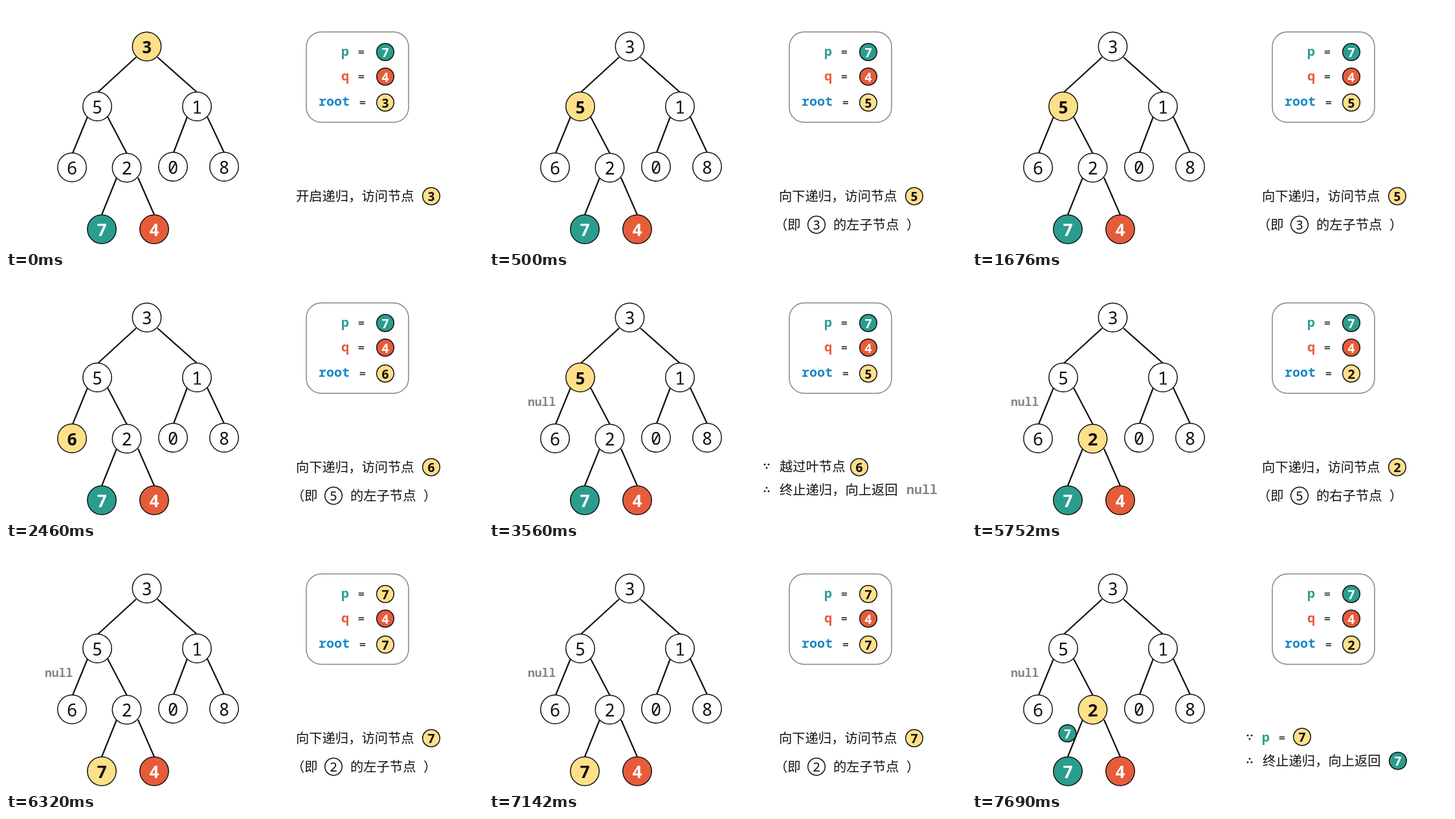
Write an HTML page that moves like this. It is 737 px wide and 375 px high and loops after 8000 ms.

```html
<!DOCTYPE html>
<html lang="zh-CN">
<head>
<meta charset="utf-8">
<style>
html, body { margin: 0; width: 100%; height: 100%; overflow: hidden; background: #fff; }
svg { display: block; width: 737px; height: 375px; }
text { white-space: pre; }
.mono { font-family: "Noto Sans Mono", "DejaVu Sans Mono", monospace; }
.han { font: 500 20.3px "Noto Sans CJK SC", "Noto Sans CJK", sans-serif; }
</style>
</head>
<body>
<svg id="stage" viewBox="0 0 737 375"></svg>
<script>
const stage = document.getElementById('stage');
const LOOP = 8000;
const INK = '#111', TEAL = '#2a9d8f', RED = '#e65c3a', GOLD = '#ffe08a', BLUE = '#1b86c4', GREY = '#858585';

// value: [x, y]
const nodes = {
  3: [217.5, 62.5], 5: [141, 155], 1: [295, 155], 6: [102, 249], 2: [186.5, 249.5],
  0: [258, 248], 8: [337, 248], 7: [148, 344.5], 4: [229, 344.5]
};
const edges = [
  [201, 79, 142, 133], [234, 79, 295, 133], [126, 171, 103, 227], [157, 171, 187, 228],
  [280, 171, 259, 226], [311, 171, 337, 226], [171, 265, 148, 322], [204, 265, 229, 322]
];

const mono = (x, y, s, fill = INK, size = 20, weight = 700, anchor = 'start') =>
  `<text class="mono" x="${x}" y="${y}" fill="${fill}" font-size="${size}" font-weight="${weight}" text-anchor="${anchor}">${s}</text>`;
const han = (x, y, s) => `<text class="han" x="${x}" y="${y}" fill="${INK}">${s}</text>`;
const equals = (x, y) => mono(x, y, '=', INK, 18, 500, 'middle');

function disc(x, y, r, size, value, fill) {
  const plain = fill === '#fff';
  const ink = plain || fill === GOLD ? INK : '#fff';
  return `<circle cx="${x}" cy="${y}" r="${r}" fill="${fill}" stroke="${INK}" stroke-width="1.5"/>` +
    mono(x, y + size * 0.357 + r * 0.05, value, ink, size, plain ? 400 : 700, 'middle');
}
const bullet = (x, y, value, fill) => disc(x, y, 13.3, 20, value, fill);

// Three dots: sign 1 is "because", -1 is "therefore"
const dots = (y, sign) => [[426, -2.7], [432, -2.7], [429, 2.7]].map(([x, dy]) =>
  `<circle cx="${x}" cy="${y + sign * dy}" r="1.4" fill="${INK}"/>`).join('');

const visit = (lead, value) => han(448, 300.5, lead + '，访问节点') + bullet(657, 293.5, value, GOLD);
const descend = (value, parent, side) => visit('向下递归', value) +
  han(441, 344.5, '（即') + bullet(506, 337.5, parent, '#fff') +
  han(532, 344.5, `的${side}子节点`) + han(645, 344.5, '）');
const giveBack = reason => dots(292, 1) + reason + dots(328, -1) + han(449, 335.5, '终止递归，向上返回');

const steps = [
  { at: 0, root: 3, caption: visit('开启递归', 3) },
  { at: 500, root: 5, caption: descend(5, 3, '左') },
  { at: 2460, root: 6, caption: descend(6, 5, '左') },
  { at: 3560, root: 5, leaf: true,
    caption: giveBack(han(449, 299.5, '越过叶节点') + bullet(572, 293.5, 6, GOLD)) + mono(645, 335, 'null', GREY) },
  { at: 4900, root: 2, leaf: true, caption: descend(2, 5, '右') },
  { at: 6320, root: 7, leaf: true, caption: descend(7, 2, '左') },
  { at: 7690, root: 2, leaf: true, found: true,
    caption: giveBack(mono(448, 298.5, 'p', TEAL) + equals(479, 298.5) + bullet(510, 291.5, 7, GOLD)) +
      bullet(658, 328.5, 7, TEAL) }
];

function draw({ root, leaf, found, caption }) {
  const color = v => v === root ? GOLD : v === 7 ? TEAL : v === 4 ? RED : '#fff';
  const lines = edges.map(([a, b, c, d]) =>
    `<path d="M${a} ${b}L${c} ${d}" stroke="${INK}" stroke-width="2.2"/>`).join('');
  const tree = Object.entries(nodes).map(([v, [x, y]]) => disc(x, y, 22.2, 27, v, color(+v))).join('');
  const panel = '<rect x="464" y="40" width="158" height="139.5" rx="23" fill="#fff" stroke="#858585" stroke-width="1.5"/>' +
    mono(518, 77, 'p', TEAL) + equals(549, 77) + bullet(586, 71, 7, color(7)) +
    mono(518, 114.5, 'q', RED) + equals(549, 114.5) + bullet(586, 109, 4, color(4)) +
    mono(483, 154, 'root', BLUE) + equals(551, 154.5) + bullet(586, 149, root, GOLD);
  stage.innerHTML = lines + tree + panel + caption +
    (leaf ? mono(60, 198.5, 'null', GREY, 18) : '') +
    (found ? bullet(147.5, 286, 7, TEAL) : '');
}

let shown;
function tick() {
  const t = performance.now() % LOOP;
  const step = steps.findLast(s => s.at <= t);
  if (step !== shown) draw(shown = step);
  requestAnimationFrame(tick);
}
tick();
</script>
</body>
</html>
```
